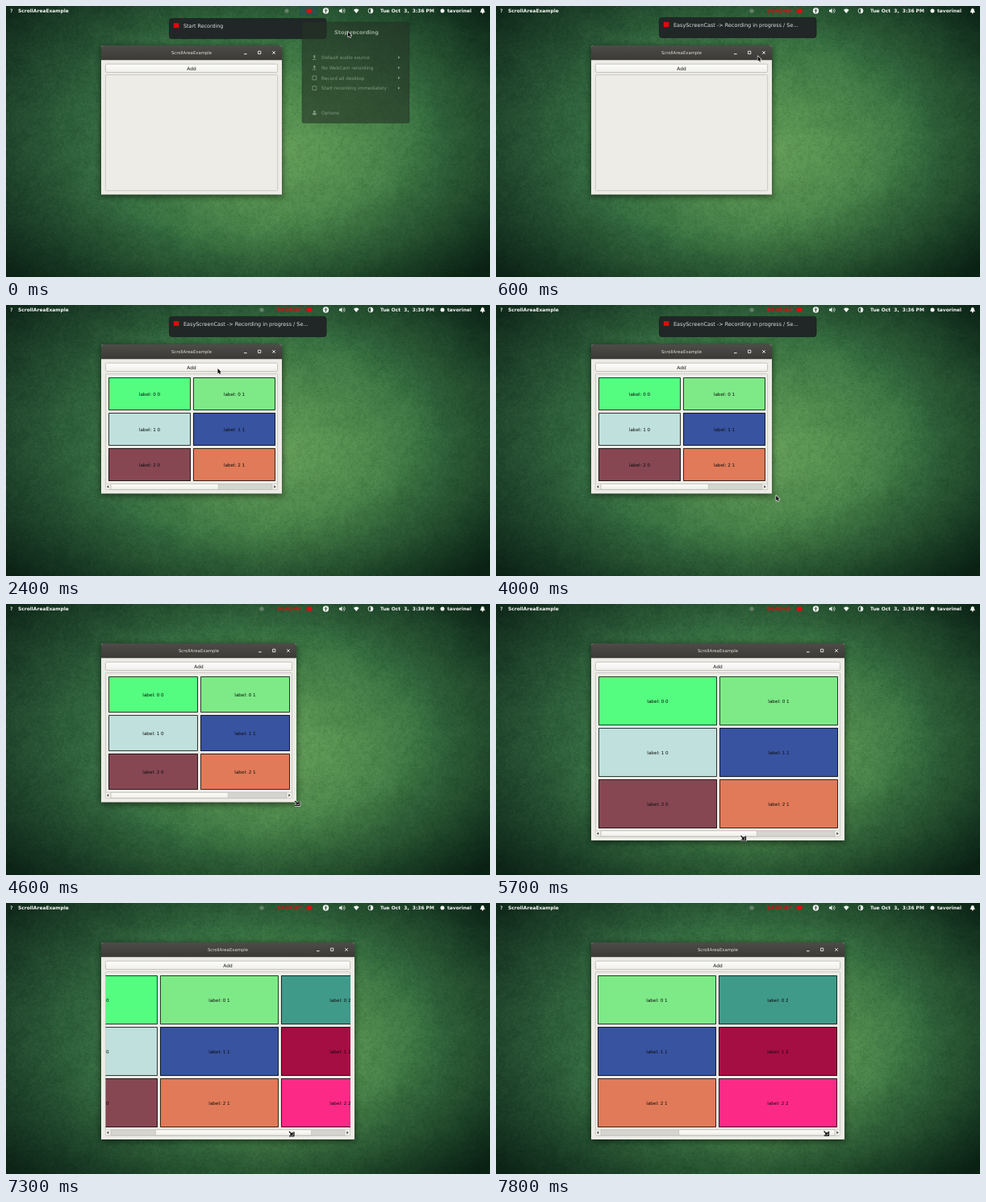
Animation of 600 by 337 pixels, one loop 8 s. Source, as an HTML page with a canvas:

```html
<!DOCTYPE html>
<html lang="en">
<head>
<meta charset="utf-8">
<title>ScrollAreaExample</title>
<style>
html, body { margin: 0; width: 100%; height: 100%; overflow: hidden; background: #1a4629; }
canvas { display: block; width: 600px; height: 337px; }
</style>
</head>
<body>
<canvas id="stage"></canvas>
<script>
const W = 600, H = 337, LOOP = 8000, STEP = 100;
const FONT = '"DejaVu Sans", sans-serif';
const canvas = document.getElementById('stage');
const dpr = window.devicePixelRatio || 1;
canvas.width = W * dpr;
canvas.height = H * dpr;
const c = canvas.getContext('2d');

const COLORS = [
  ['#54fd80', '#bfe0dc', '#864753'],
  ['#7dea87', '#3853a0', '#e17a58'],
  ['#409a8a', '#a50e43', '#fd2986']
];
const ADDED = [1200, 1700, 2100];
const PRESSED = [1100, 1600, 2000];

// time, x, y of the pointer
const PATH = [
  [0, 424, 32], [100, 422, 33], [500, 340, 58], [1000, 262.5, 79], [2500, 262.5, 79],
  [3300, 326, 196], [3500, 326, 196], [3600, 334, 217], [3700, 334, 217],
  [4000, 347.2, 237], [4200, 347.2, 237], [4400, 343, 236],
  [4500, 343, 236], [5000, 433, 295], [5100, 433, 295],
  [5700, 306.5, 291], [6200, 298.5, 287.5], [6900, 298.5, 287.5], [7700, 409.5, 286.5]
];

const clamp = (v, a = 0, b = 1) => Math.min(b, Math.max(a, v));
const ramp = (t, a, b) => clamp((t - a) / (b - a));

function pointer(t) {
  let i = 0;
  while (i < PATH.length - 1 && PATH[i + 1][0] <= t) i++;
  const a = PATH[i], b = PATH[i + 1] || a;
  const k = a === b ? 0 : (t - a[0]) / (b[0] - a[0]);
  return [a[1] + (b[1] - a[1]) * k, a[2] + (b[2] - a[2]) * k];
}

function text(s, x, y, size, color, align = 'left', weight = '') {
  c.font = `${weight} ${size}px ${FONT}`;
  c.textAlign = align;
  c.fillStyle = color;
  c.fillText(s, x, y);
}

function box(x, y, w, h, fill, stroke, r = 0, line = 0.8) {
  c.beginPath();
  c.roundRect(x, y, w, h, r);
  if (fill) { c.fillStyle = fill; c.fill(); }
  if (stroke) { c.strokeStyle = stroke; c.lineWidth = line; c.stroke(); }
}

function disc(x, y, r, color) {
  c.beginPath();
  c.arc(x, y, r, 0, 7);
  c.fillStyle = color;
  c.fill();
}

function shape(points, fill) {
  c.beginPath();
  points.forEach(([x, y]) => c.lineTo(x, y));
  c.closePath();
  c.fillStyle = fill;
  c.fill();
}

function arc(x, y, r, a, b, color, line) {
  c.beginPath();
  c.arc(x, y, r, a, b);
  c.strokeStyle = color;
  c.lineWidth = line;
  c.stroke();
}

function vertical(y0, y1, a, b) {
  const g = c.createLinearGradient(0, y0, 0, y1);
  g.addColorStop(0, a);
  g.addColorStop(1, b);
  return g;
}

// Wallpaper, painted once
function random(seed) {
  return () => (seed = (seed * 16807) % 2147483647) / 2147483647;
}

function grain(w, h, seed) {
  const tile = document.createElement('canvas');
  tile.width = w;
  tile.height = h;
  const g = tile.getContext('2d'), rnd = random(seed);
  for (let y = 0; y < h; y++) {
    for (let x = 0; x < w; x++) {
      g.fillStyle = rnd() < 0.5 ? `rgba(0,25,12,${rnd()})` : `rgba(140,190,125,${rnd() * 0.8})`;
      g.fillRect(x, y, 1, 1);
    }
  }
  return tile;
}

function makeWallpaper() {
  const wall = document.createElement('canvas');
  wall.width = W;
  wall.height = H;
  const g = wall.getContext('2d');
  const oval = (x, y, rx, ry, stops) => {
    const grad = g.createRadialGradient(0, 0, 0, 0, 0, 1);
    stops.forEach(([at, color]) => grad.addColorStop(at, color));
    g.save();
    g.translate(x, y);
    g.scale(rx, ry);
    g.fillStyle = grad;
    g.fillRect(-9, -9, 18, 18);
    g.restore();
  };
  oval(345, 185, 385, 300, [[0, '#69a45e'], [0.25, '#559352'], [0.5, '#3b7746'],
    [0.75, '#2e603d'], [1, '#264d34']]);
  [[600, 337, 0.09], [200, 112, 0.07], [40, 22, 0.05]].forEach(([w, h, alpha], i) => {
    g.globalAlpha = alpha;
    g.drawImage(grain(w, h, 77 + i), 0, 0, W, H);
  });
  g.globalAlpha = 1;
  oval(282, 156, 430, 245, [[0, 'rgba(0,18,9,0)'], [0.5, 'rgba(0,18,9,0.04)'],
    [0.75, 'rgba(0,18,9,0.34)'], [1, 'rgba(0,18,9,0.78)']]);
  return wall;
}
const wallpaper = makeWallpaper();

function drawPanel(t) {
  const white = '#f4f6f4', red = '#e00b10', recording = t >= 300;
  text('?', 5, 8.2, 6, '#c9d2ca', 'left', 'bold');
  text('ScrollAreaExample', 15, 8.2, 5.95, white, 'left', 'bold');
  disc(recording ? 317 : 348, 6, 2.6, '#66806a');
  if (recording) {
    text('00:00:0' + Math.floor(t / 1000), 336, 8.2, 5.95, red, 'left', 'bold');
  } else {
    box(364, 0, 22, 12, 'rgba(30,80,95,0.45)');
  }
  box(372.5, 3.5, 7, 5, red, null, 1);
  disc(396.5, 6, 3.7, white);
  disc(396.5, 4.3, 0.7, '#24452d');
  box(394.5, 5.4, 4, 0.7, '#24452d');
  box(396, 5.4, 1, 3, '#24452d');
  shape([[413, 4.8], [414.5, 4.8], [416.5, 3], [416.5, 9], [414.5, 7.2], [413, 7.2]], white);
  arc(416.5, 6, 2, -0.9, 0.9, white, 0.7);
  arc(416.5, 6, 3.7, -0.9, 0.9, white, 0.7);
  c.beginPath();
  c.moveTo(434.3, 9);
  c.arc(434.3, 9, 5.3, -2.25, -0.89);
  c.fillStyle = white;
  c.fill();
  arc(452, 6, 3, 0, 7, white, 0.8);
  c.beginPath();
  c.arc(452, 6, 3, -1.57, 1.57);
  c.fillStyle = white;
  c.fill();
  text('Tue Oct  3,  3:36 PM', 464, 8.2, 5.95, white, 'left', 'bold');
  disc(541, 6, 2.5, white);
  text('tavorinel', 547, 8.2, 5.95, white, 'left', 'bold');
  shape([[587.5, 8], [588.5, 6.5], [589, 4], [590.8, 2.8], [592.6, 4], [593, 6.5], [594, 8]], white);
  disc(590.8, 8.7, 0.9, white);
}

function drawMenu(t) {
  const alpha = 1 - ramp(t, 0, 300);
  if (!alpha) return;
  c.save();
  c.globalAlpha = alpha;
  box(367, 20, 133, 125.5, 'rgba(36,50,38,0.62)', 'rgba(30,42,32,0.4)', 2);
  const ink = '#7f9681';
  text('Stop recording', 434.5, 35.2, 6.55, '#91a593', 'center', 'bold');
  ['Default audio source', 'No WebCam recording', 'Record all desktop', 'Start recording immediately']
    .forEach((item, i) => {
      const y = 64 + i * 12.7;
      text(item, 391, y + 2.1, 5.75, ink);
      shape([[486, y - 1.8], [488.5, y], [486, y + 1.8]], ink);
      if (i < 2) {
        box(381.3, y - 3, 2, 4, ink, null, 1);
        box(380, y + 2, 4.6, 0.8, ink);
      } else {
        box(380, y - 2.4, 4.8, 4.8, null, ink);
      }
    });
  text('Options', 391, 135.2, 5.75, ink);
  disc(382.3, 131.5, 1.4, ink);
  box(379.8, 133, 5, 2.6, ink, null, 1);
  c.restore();
}

function drawNotice(t) {
  const out = ramp(t, 4100, 4400);
  if (out === 1) return;
  const first = t < 300;
  c.save();
  c.globalAlpha = 1 - out;
  c.translate(0, (first ? 1.2 : 0) - 26 * out);
  box(202.5, 14.4, 194.5, 25, 'rgba(33,37,38,0.96)', '#1b2020', 3);
  box(207.8, 20, 6.6, 6, '#e0090e');
  text(first ? 'Start Recording' : 'EasyScreenCast -> Recording in progress / Se...',
    220, 25.7, first ? 6.37 : 6.47, '#dfe1df');
  c.restore();
}

function drawLabels(x, y, right, bottom, cols, scroll) {
  const scrolls = cols === 3, gap = 3, n = scrolls ? 2 : cols;
  const colW = Math.round((right - x - 19 - (n - 1) * gap + (scrolls ? 2 : 0)) / n);
  const rowH = Math.round((bottom - y - (scrolls ? 15.5 : 9.7) - 41 - 2 * gap) / 3);
  const range = 3 * (colW + gap) + 5 - (right - x - 10);
  const shift = scrolls ? Math.round(scroll * range) : 0;
  c.save();
  c.beginPath();
  c.rect(x + 5.5, y + 37, right - x - 10.5, bottom - y - 42);
  c.clip();
  for (let i = 0; i < cols; i++) {
    for (let j = 0; j < 3; j++) {
      const lx = x + 9 + i * (colW + gap) - shift;
      const ly = y + 41 + j * (rowH + gap);
      box(lx, ly, colW, rowH, COLORS[i][j]);
      box(lx + 0.5, ly + 0.5, colW - 1, rowH - 1, null, 'rgba(8,12,10,0.78)', 0, 1);
      text(`label: ${j} ${i}`, lx + colW / 2, ly + rowH / 2 + 2.1, 5.65, '#0c0c0c', 'center');
    }
  }
  c.restore();
}

function drawScrollbar(x, right, bottom, scroll) {
  const y = bottom - 12, left = x + 12, len = right - 12 - left, size = len * 2 / 3;
  box(x + 5.4, y, right - x - 10.8, 7, '#f1f0eb', '#c9c8c1', 0, 0.6);
  box(left, y, len, 7, '#d5d4ce', '#bbbab3', 0, 0.6);
  box(left + scroll * (len - size), y, size, 7, vertical(y, y + 7, '#fdfdfb', '#efeee9'), '#b5b4ad', 1, 0.6);
  const my = y + 3.5;
  shape([[x + 7, my], [x + 9.2, my - 1.7], [x + 9.2, my + 1.7]], '#333');
  shape([[right - 7.4, my], [right - 9.6, my - 1.7], [right - 9.6, my + 1.7]], '#333');
}

function drawWindow(t, scroll) {
  const grow = ramp(t, 4500, 5000);
  const x = 118, y = 49, right = 342 + 90 * grow, bottom = 234.5 + 59.5 * grow;
  const w = right - x, mid = x + w / 2;
  c.save();
  c.shadowColor = 'rgba(0,0,0,0.6)';
  c.shadowBlur = 9 * dpr;
  c.shadowOffsetY = 2 * dpr;
  box(x, y, w, bottom - y, '#edece6', null, [3, 3, 0, 0]);
  c.restore();
  box(x, y, w, 18.2, vertical(y, y + 18, '#4d4c48', '#3b3a37'), null, [3, 3, 0, 0]);
  text('ScrollAreaExample', mid, y + 10.8, 5.35, '#dedcd5', 'center');
  box(right - 47, y + 10.2, 3.6, 1, '#eee');
  box(right - 29.4, y + 7.2, 3.2, 3.4, null, '#eee', 0, 0.9);
  c.beginPath();
  for (const d of [-1.7, 1.7]) {
    c.moveTo(right - 10 - d, y + 7.3);
    c.lineTo(right - 10 + d, y + 10.7);
  }
  c.strokeStyle = '#eee';
  c.lineWidth = 1;
  c.stroke();

  const down = PRESSED.includes(t);
  box(x + 5.4, y + 23.2, w - 10.8, 10.4,
    down ? '#dddcd6' : vertical(y + 23, y + 34, '#fefefd', '#efeee9'), '#b9b8b1', 1.5);
  text('Add', mid, y + 30.6, 5.9, '#151515', 'center');
  box(x + 5.4, y + 36.6, w - 10.8, bottom - y - 41.4, '#edece6', '#bebdb6', 1, 0.7);

  const cols = ADDED.filter(a => t >= a).length;
  if (cols) drawLabels(x, y, right, bottom, cols, scroll);
  if (cols === 3) drawScrollbar(x, right, bottom, scroll);
}

function drawPointer(t, x, y) {
  c.save();
  c.translate(x, y);
  c.lineJoin = 'round';
  c.beginPath();
  if (t < 4300) {
    [[0, 0], [0, 6.2], [1.4, 5], [2.5, 7.3], [3.5, 6.8], [2.5, 4.6], [4.4, 4.5]]
      .forEach(p => c.lineTo(...p));
    c.closePath();
    c.strokeStyle = '#f4f4f4';
    c.lineWidth = 1.2;
    c.stroke();
    c.fillStyle = '#080808';
    c.fill();
  } else {
    c.moveTo(3, -2.6);
    c.lineTo(3, 2.8);
    c.lineTo(-3, 2.8);
    c.moveTo(-3, -2.8);
    c.lineTo(1, 0.9);
    c.moveTo(1.2, -1.8);
    c.lineTo(1.2, 1);
    c.lineTo(-1.8, 1);
    for (const [color, line] of [['#fff', 2.6], ['#080808', 1.3]]) {
      c.strokeStyle = color;
      c.lineWidth = line;
      c.stroke();
    }
  }
  c.restore();
}

function draw(t) {
  c.setTransform(dpr, 0, 0, dpr, 0, 0);
  c.drawImage(wallpaper, 0, 0, W, H);
  const [px, py] = pointer(t);
  const scroll = t < 6900 ? 0 : clamp((px - 298.5) / 97);
  drawPanel(t);
  drawWindow(t, scroll);
  drawNotice(t);
  drawMenu(t);
  drawPointer(t, px, py);
}

const start = performance.now();
function tick() {
  const t = (performance.now() - start) % LOOP;
  draw(Math.floor(t / STEP) * STEP);
  requestAnimationFrame(tick);
}
tick();
</script>
</body>
</html>
```
